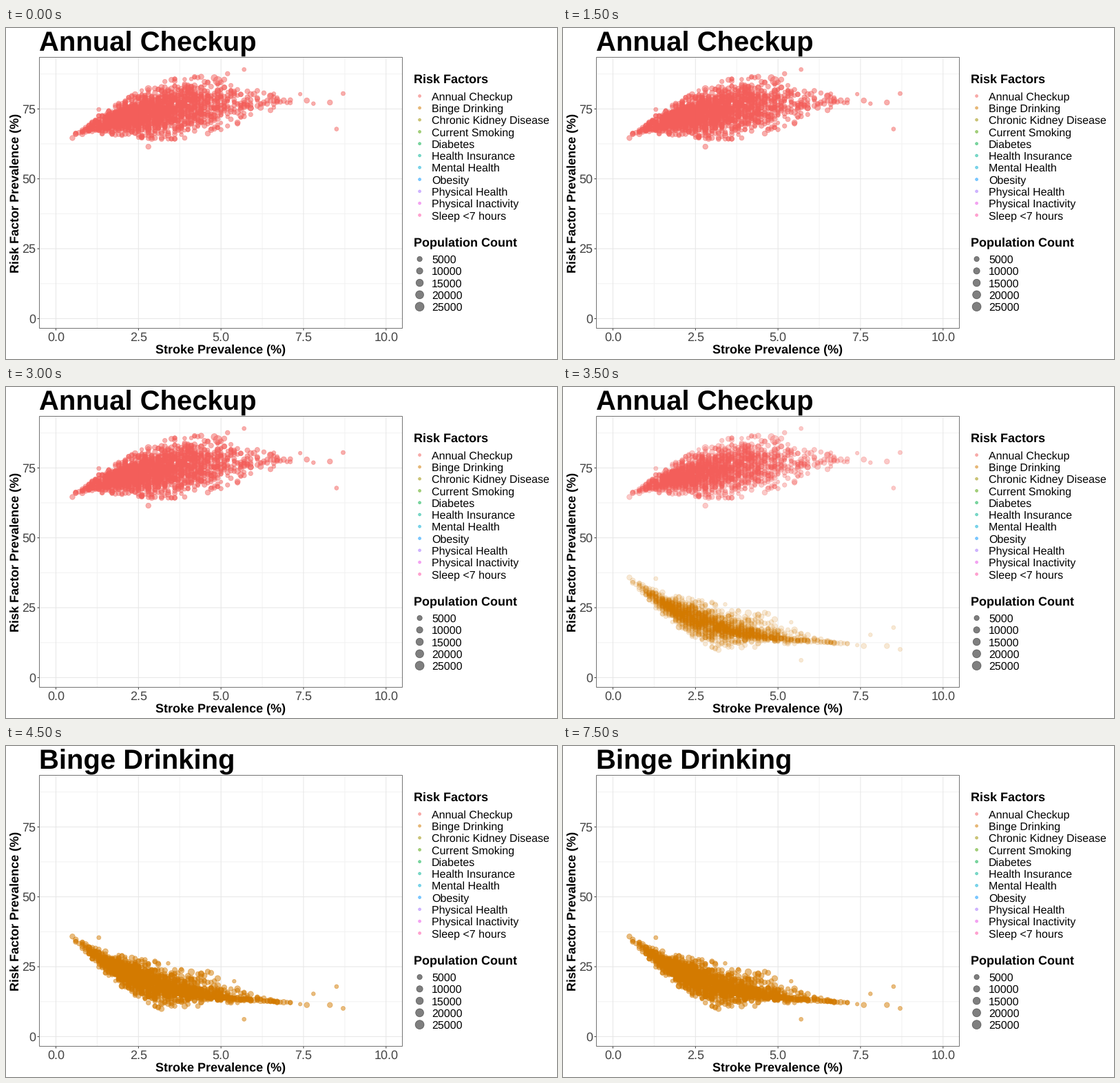
A matplotlib script that plays this animation: 800 px wide and 480 px high, repeating every 8 s.

```python
import numpy as np
import matplotlib.pyplot as plt
from matplotlib.animation import FuncAnimation
from matplotlib.patches import Rectangle

plt.rcParams["font.family"] = "Liberation Sans"
plt.rcParams["text.hinting"] = "none"

W, H, DPI = 800, 480, 80
PX = 72 / DPI              # points per pixel
FRAMES, STEP = 16, 500
FADE_START, FADE_STEPS = 6, 3
ALPHA = 0.5
STROKE = 0.71
LEFT, RIGHT, TOP, BOTTOM = 48.5, 575.5, 42.5, 435.5
INK, TICK = "#434343", "#333333"
MAJOR, MINOR = "#E6E6E6", "#F2F2F2"

FACTORS = {
    "Annual Checkup": "#F35E5A",
    "Binge Drinking": "#D37A00",
    "Chronic Kidney Disease": "#9E9100",
    "Current Smoking": "#4FA300",
    "Diabetes": "#00AF47",
    "Health Insurance": "#00B496",
    "Mental Health": "#00ACD6",
    "Obesity": "#0095FF",
    "Physical Health": "#A471FF",
    "Physical Inactivity": "#EB52E7",
    "Sleep <7 hours": "#FF4EA7",
}
NAMES, COLORS = list(FACTORS), list(FACTORS.values())

# lone points: stroke %, checkup %, drinking %, population
LONE = [
    (0.5, 64.6, 35.8, 5500),
    (1.3, 74.8, 35.4, 2500),
    (2.8, 61.5, 14.5, 5500),
    (4.9, 85.0, 14.5, 25500),
    (5.2, 87.6, 14.2, 3500),
    (5.7, 89.1, 6.2, 2200),
    (7.4, 80.3, 11.6, 1500),
    (7.6, 78.0, 11.3, 6000),
    (7.8, 76.9, 15.3, 1900),
    (8.3, 77.3, 11.3, 5500),
    (8.5, 67.8, 17.9, 2200),
    (8.7, 80.5, 10.1, 2500),
]


def px_x(v):
    return 72.5 + 47.93 * np.asarray(v)


def px_y(v):
    return 421.4 - 4.054 * np.asarray(v)


def radius(pop):
    size = 1 + 5 * np.sqrt(np.asarray(pop) / 28000)
    return 0.375 * (size * 2.845 + 0.945)


def make_tracts(seed=11, count=1850):
    rng = np.random.default_rng(seed)
    x = np.where(rng.random(count) < 0.13,
                 rng.normal(1.7, 0.38, count), rng.gamma(8, 0.41, count))
    x = np.round(x[(x > 0.55) & (x < 7.15)], 1)
    n = len(x)
    # the clouds are widest in the middle and pinch at both ends
    swell = np.sin(np.pi * np.clip((x - 0.5) / 6.8, 0, 1)) ** 1.4

    spread = np.clip(rng.normal(0, 0.42, n), -1, 1)
    checkup = 79 - 16 * np.exp(-x / 2.6) + spread * (0.8 + 10 * swell)

    # on the right the drinking cloud is a tight core with scatter above it
    t = np.clip(rng.normal(0, 1, n), -2.4, 2.4)
    t[(x > 3) & (rng.random(n) < 0.5)] *= 0.4
    below = np.minimum(1, np.exp((3.3 - x) / 1.5))
    drinking = (11 + 31 * np.exp(-x / 2.2)
                + t * (0.6 + 3.1 * swell) * np.where(t < 0, below, 1))

    pop = np.clip(rng.lognormal(np.log(3700), 0.42, n), 400, 11000)
    bulk = np.column_stack([x, checkup.round(1), drinking.round(1), pop])
    return np.vstack([bulk, LONE])


fig = plt.figure(figsize=(W / DPI, H / DPI), dpi=DPI, facecolor="white")
ax = fig.add_axes([0, 0, 1, 1])
ax.set_xlim(0, W)
ax.set_ylim(H, 0)
ax.axis("off")


def line(xs, ys, color, width=1.0, z=1.0):
    ax.plot(xs, ys, color=color, lw=width * PX, zorder=z,
            solid_capstyle="butt", snap=False)


def label(x, y, text, size, color="black", **kw):
    return ax.text(x, y, text, fontsize=size * PX, color=color, va="baseline", **kw)


def dots(x, y, r, color):
    return ax.scatter(x, y, s=(2 * r * PX) ** 2, c=color, alpha=ALPHA,
                      linewidths=STROKE * PX, edgecolors="face", zorder=3)


# panel
for i in range(9):
    x = px_x(1.25 * i)
    minor = i % 2
    line([x, x], [TOP, BOTTOM], MINOR if minor else MAJOR, z=1 - 0.1 * minor)
for i in range(8):
    y = px_y(12.5 * i)
    minor = i % 2
    line([LEFT, RIGHT], [y, y], MINOR if minor else MAJOR, z=1 - 0.1 * minor)
ax.add_patch(Rectangle((LEFT, TOP), RIGHT - LEFT, BOTTOM - TOP, fill=False,
                       ec="#747474", lw=PX, zorder=5, snap=False))

for i in range(5):
    x = px_x(2.5 * i)
    line([x, x], [BOTTOM, BOTTOM + 3], TICK)
    label(x, 454, f"{2.5 * i:.1f}", 18, INK, ha="center")
for i in range(4):
    y = px_y(25 * i)
    line([LEFT - 3, LEFT], [y, y], TICK)
    label(43.5, y + 6.1, str(25 * i), 18, INK, ha="right")

title = label(48, 34, "", 40, weight="bold")
label(312, 471, "Stroke Prevalence (%)", 18, weight="bold", ha="center")
label(18, 239, "Risk Factor Prevalence (%)", 18, weight="bold", ha="center",
      rotation=90, rotation_mode="anchor")


# legends
def legend(heading, heading_y, names, first_y, r, color):
    label(592, heading_y, heading, 18, weight="bold")
    ys = first_y + 17.28 * np.arange(len(names))
    dots(np.full(len(names), 600.6), ys, r, color)
    for name, y in zip(names, ys):
        label(618, y + 6, name, 16)


pops = 5000 * np.arange(1, 6)
legend("Risk Factors", 80, NAMES, 98.6, 1.95, COLORS)
legend("Population Count", 316, [str(p) for p in pops], 335, radius(pops), "black")

# data
stroke, checkup, drinking, pop = make_tracts().T
clouds = [dots(px_x(stroke), px_y(rate), radius(pop), color)
          for rate, color in zip((checkup, drinking), COLORS)]


def update(frame):
    mix = min(max((frame - FADE_START) / FADE_STEPS, 0), 1)
    for cloud, share in zip(clouds, (1 - mix, mix)):
        cloud.set_alpha(ALPHA * share)
        cloud.set_visible(share > 0)
    title.set_text(NAMES[int(mix == 1)])
    return [*clouds, title]


anim = FuncAnimation(fig, update, frames=FRAMES, interval=STEP, repeat=True, repeat_delay=0)
plt.show()
```
